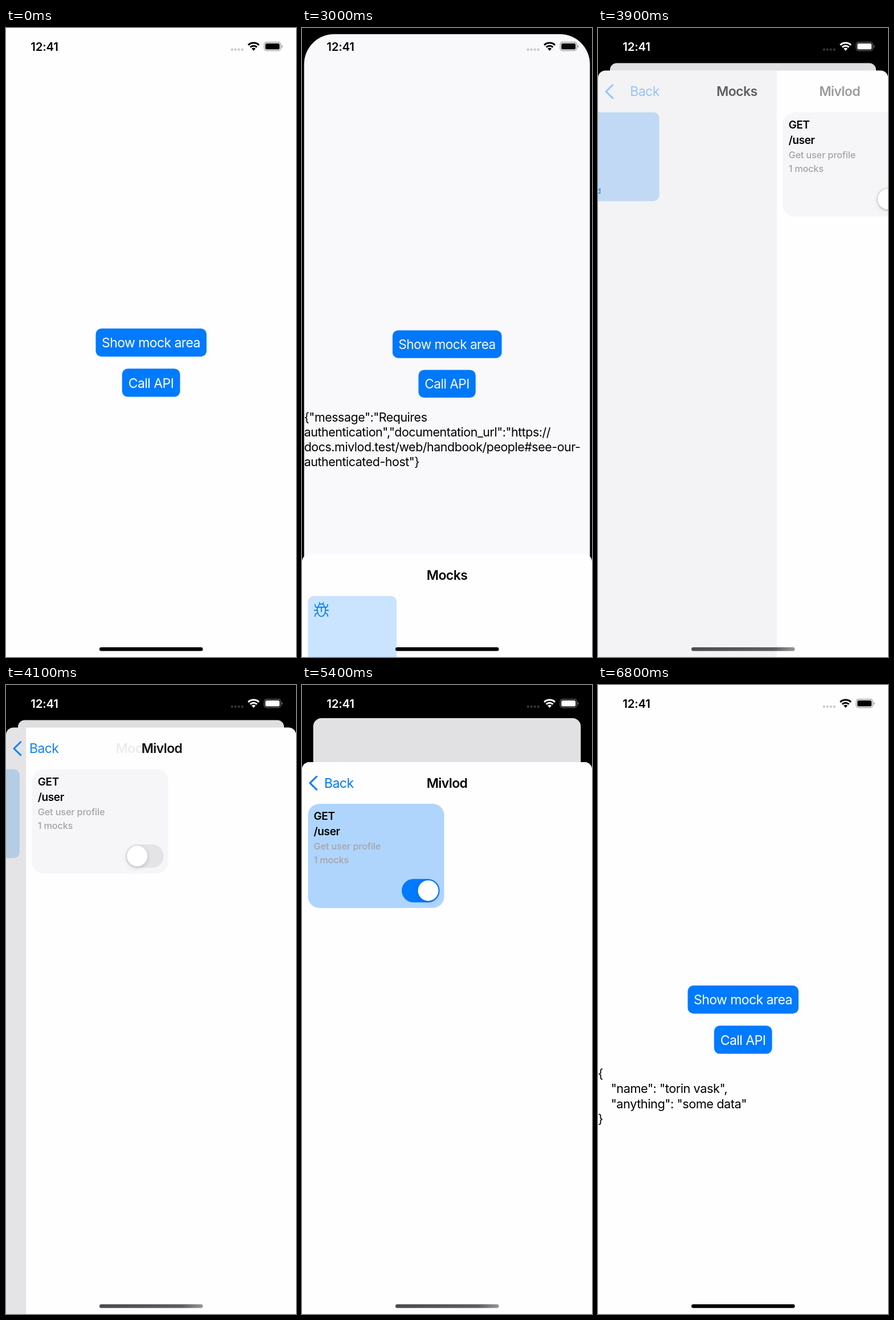
Recreate the animation shown at these times as an HTML page with a canvas. Size 509 px wide and 1101 px high, loop 8000 ms.

```html
<!DOCTYPE html>
<html lang="en">
<head>
<meta charset="utf-8">
<title>Mock area</title>
<style>
  html, body { margin: 0; width: 100%; height: 100%; overflow: hidden; background: #fefdff; }
  canvas { display: block; width: 509px; height: 1101px; }
</style>
</head>
<body>
<canvas id="stage"></canvas>
<script>
const W = 509, H = 1101, LOOP = 8000, STEP = 100;
const PAPER = '#fefdff', BLUE = '#007aff', MID = W / 2;
const SHEET_TOP = 74.5, CARD_TOP = 61.5, SCREEN_RADIUS = 62, SHEET_RADIUS = 13;

const DENIED = [
  '{"message":"Requires',
  'authentication","documentation_url":"https://',
  'docs.mivlod.test/web/handbook/people#see-our-',
  'authenticated-host"}'
];
const MOCKED = [
  '{',
  '    "name": "torin vask",',
  '    "anything": "some data"',
  '}'
];

const canvas = document.getElementById('stage');
const ctx = canvas.getContext('2d');
const ratio = window.devicePixelRatio || 1;
canvas.width = Math.round(W * ratio);
canvas.height = Math.round(H * ratio);

const clamp = v => Math.min(1, Math.max(0, v));
const mix = (a, b, k) => a + (b - a) * k;
const smooth = v => { v = clamp(v); return v * v * (3 - 2 * v); };
const within = (t, a, b) => t >= a && t < b;

// Critically damped spring going from 0 to 1
function spring(t, start, speed) {
  const x = Math.max(0, t - start) / 1000 * speed;
  return 1 - (1 + x) * Math.exp(-x);
}

function box(x, y, w, h, r, fill) {
  ctx.beginPath();
  ctx.roundRect(x, y, w, h, r);
  ctx.fillStyle = fill;
  ctx.fill();
}

function stroke(width, color, path) {
  ctx.lineWidth = width;
  ctx.strokeStyle = color;
  ctx.beginPath();
  path();
  ctx.stroke();
}

function line(...pts) {
  ctx.moveTo(pts[0], pts[1]);
  for (let i = 2; i < pts.length; i += 2) ctx.lineTo(pts[i], pts[i + 1]);
}

function label(str, x, y, size, { weight = 400, color = '#000', align = 'left', track = -0.025, alpha = 1 } = {}) {
  ctx.save();
  ctx.globalAlpha *= alpha;
  ctx.font = `${weight} ${size}px Inter, "Liberation Sans", sans-serif`;
  ctx.letterSpacing = `${track * size}px`;
  ctx.textAlign = align;
  ctx.fillStyle = color;
  ctx.fillText(str, x, y);
  ctx.restore();
}

function shifted(dx, dy, draw) {
  ctx.save();
  ctx.translate(dx, dy);
  draw();
  ctx.restore();
}

function button(str, x, y, w, pressed) {
  box(x, y, w, 49.3, 10, BLUE);
  label(str, MID, y + 33.2, 23, { color: '#fff', align: 'center', alpha: pressed ? 0.3 : 1 });
}

function home(t) {
  button('Show mock area', 157.5, 526, 194.5, within(t, 2900, 3000));
  button('Call API', 203.7, 596.3, 101.8, within(t, 500, 900) || within(t, 6600, 6800));
  const lines = t >= 6800 ? MOCKED : t >= 1600 ? DENIED : [];
  lines.forEach((str, i) => label(str, 0, 688 + i * 26.4, 21.7, { track: -0.02 }));
}

function bug() {
  stroke(1.8, '#0f7ff0', () => {
    line(34, 167, 34, 175);
    line(27, 167, 41, 167);
    ctx.moveTo(27, 167);
    ctx.bezierCurveTo(24.5, 188.5, 43.5, 188.5, 41, 167);
    ctx.moveTo(28.5, 167);
    ctx.bezierCurveTo(28.5, 159.7, 39.5, 159.7, 39.5, 167);
    for (const s of [-1, 1]) {
      line(34 + s * 2.5, 162, 34 + s * 3.5, 159);
      line(34 + s * 7, 168.5, 34 + s * 10.5, 166, 34 + s * 11, 162.5);
      line(34 + s * 7.8, 172.5, 34 + s * 12.3, 172.5);
      line(34 + s * 7, 177, 34 + s * 10.5, 179.3, 34 + s * 11.3, 183);
    }
  });
}

function mockList() {
  box(10.5, 147.5, 155.5, 155.5, 10, '#cae3ff');
  bug();
  label('Mivlod', 21, 290, 13.3, { color: '#0f7ff0', track: 0.01 });
}

function toggle(on) {
  box(175, 279, 66.5, 41, 20.5, on > 0.5 ? BLUE : '#e4e3e6');
  ctx.save();
  ctx.shadowColor = 'rgba(0,0,0,0.18)';
  ctx.shadowBlur = 6 * ratio;
  ctx.shadowOffsetY = 2 * ratio;
  box(mix(177, 203.5, on), 281.5, 36, 36, 18, '#fff');
  ctx.restore();
}

function endpoint(t) {
  const on = t < 4700 ? 0 : t >= 5000 ? 1 : smooth((t - 4640) / 320);
  const bold = { weight: 600, track: -0.02 };
  const faint = { weight: 500, color: '#a5a4a8', track: -0.01 };
  box(10.5, 147.5, 239, 182.3, 20, t >= 4800 ? '#afd5fd' : '#f6f5f8');
  label('GET', 20.5, 175.7, 19, bold);
  label('/user', 20.5, 203, 19, bold);
  label('Get user profile', 20.5, 227.8, 16.3, faint);
  label('1 mocks', 20.5, 251.8, 16.3, faint);
  toggle(on);
}

function navBar(q) {
  const title = { weight: 600, align: 'center' };
  label('Mocks', MID - 28 * q, 119.3, 23, { ...title, alpha: 1 - q });
  if (!q) return;
  label('Mivlod', MID + 275 * (1 - q), 119.3, 23, { ...title, alpha: q });
  label('Back', 39 + 28 * (1 - q), 119.3, 23, { color: BLUE, alpha: q });
  ctx.globalAlpha = q;
  stroke(3, BLUE, () => line(25.7, 99.8, 14, 111.2, 25.7, 122.6));
  ctx.globalAlpha = 1;
}

function sheet(t, shown, moving) {
  const q = t < 3900 ? 0 : t >= 4400 ? 1 : spring(t, 3812, 15.1);
  const low = moving ? SCREEN_RADIUS : 0;
  shifted(0, (H - SHEET_TOP) * (1 - shown), () => {
    box(0, SHEET_TOP, W, H - SHEET_TOP, [SHEET_RADIUS, SHEET_RADIUS, low, low], PAPER);
    ctx.clip();
    if (q < 1) shifted(-0.3 * W * q, 0, mockList);
    if (q > 0) {
      ctx.fillStyle = `rgba(0,0,0,${0.11 * q})`;
      ctx.fillRect(0, SHEET_TOP, W, H);
      shifted(W * (1 - q), 0, () => {
        ctx.fillStyle = PAPER;
        ctx.fillRect(0, SHEET_TOP, W, H);
        endpoint(t);
      });
    }
    navBar(q);
  });
}

function statusBar(white) {
  const g = Math.round(255 * white);
  const color = `rgb(${g},${g},${g})`;
  label('12:41', 67.5, 40.2, 20.4, { weight: 600, color, align: 'center', track: -0.01 });

  ctx.fillStyle = color;
  ctx.globalAlpha = 0.22;
  for (let i = 0; i < 4; i++) {
    ctx.beginPath();
    ctx.arc(396.7 + i * 6, 37.8, 2.1, 0, Math.PI * 2);
    ctx.fill();
  }
  ctx.globalAlpha = 1;

  const up = -Math.PI / 2, spread = 0.76;
  ctx.lineCap = 'butt';
  for (const r of [8.4, 13.7])
    stroke(3.1, color, () => ctx.arc(434.6, 39.7, r, up - spread, up + spread));
  ctx.lineCap = 'round';
  ctx.beginPath();
  ctx.moveTo(434.6, 39.9);
  ctx.arc(434.6, 39.7, 5, up - spread, up + spread);
  ctx.fill();

  ctx.globalAlpha = 0.4;
  stroke(1.3, color, () => ctx.roundRect(453.2, 25, 29, 14.6, 4.3));
  box(483.7, 30, 1.8, 4.8, [0, 2, 2, 0], color);
  ctx.globalAlpha = 1;
  box(455.2, 27, 25, 10.6, 2.6, color);
}

function homeBar(overSheet) {
  let fill = '#000';
  if (overSheet) {
    fill = ctx.createLinearGradient(164, 0, 345, 0);
    fill.addColorStop(0, '#4d4b4f');
    fill.addColorStop(0.8, '#5f5d61');
    fill.addColorStop(1, '#98969a');
  }
  box(164, 1084, 181.5, 6.4, 3.2, fill);
}

function draw(t) {
  const opening = within(t, 2950, 3600), closing = within(t, 5400, 6000);
  const active = within(t, 2950, 6000);
  const shown = !active ? 0
    : opening ? spring(t, 2950, 15.1)
    : closing ? 1 - spring(t, 5385, 26) : 1;
  const white = smooth((t - 2950) / 460) - smooth((t - 5440) / 460);

  ctx.setTransform(ratio, 0, 0, ratio, 0, 0);
  ctx.lineCap = ctx.lineJoin = 'round';
  ctx.fillStyle = active ? '#000' : PAPER;
  ctx.fillRect(0, 0, W, H);

  const scale = 1 - 0.0825 * shown;
  ctx.save();
  ctx.translate(MID * (1 - scale), CARD_TOP * shown);
  ctx.scale(scale, scale);
  if (active) {
    box(0, 0, W, H, mix(SCREEN_RADIUS, SHEET_RADIUS, shown), PAPER);
    ctx.clip();
  }
  home(t);
  if (active) {
    ctx.fillStyle = `rgba(0,0,0,${0.12 * shown})`;
    ctx.fillRect(0, 0, W, H);
  }
  ctx.restore();

  if (active) sheet(t, shown, opening || closing);
  statusBar(white);
  homeBar(shown > 0.5);
}

const begin = performance.now();
function tick() {
  const t = (performance.now() - begin) % LOOP;
  draw(Math.floor(t / STEP) * STEP);
  requestAnimationFrame(tick);
}
tick();
</script>
</body>
</html>
```
